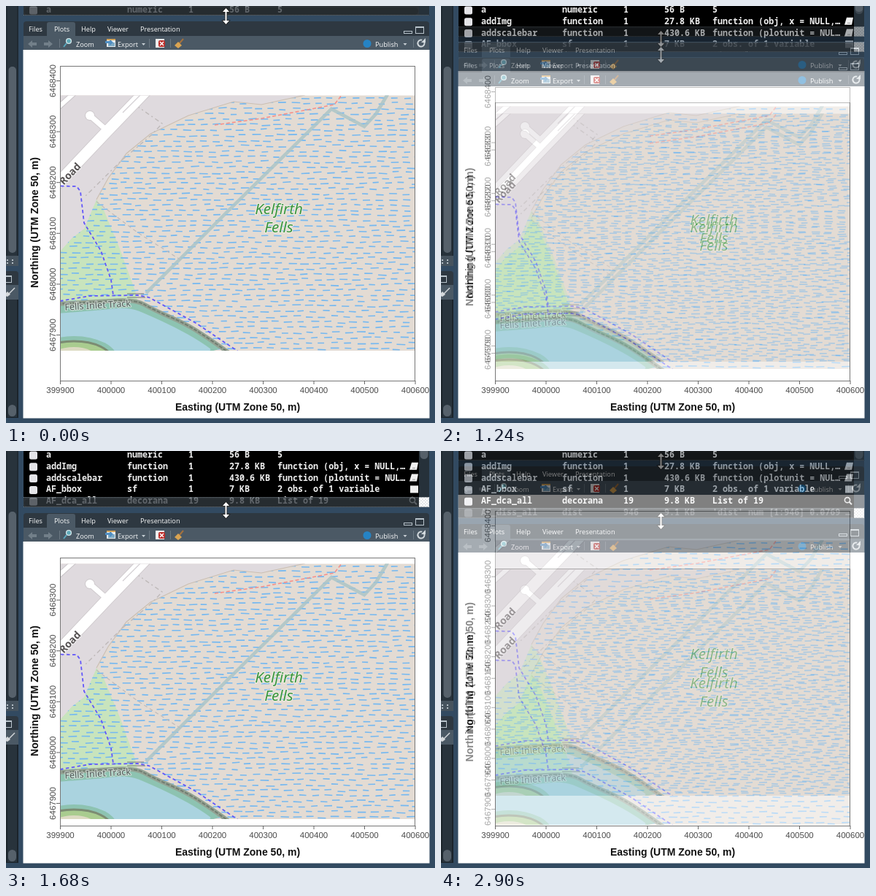
Recreate the animation shown at these times as an HTML page with a canvas. Size 588x571 px, loop 2920 ms.

```html
<!DOCTYPE html>
<html lang="en">
<head>
<meta charset="utf-8">
<title>Resizing the plot pane</title>
<style>
html, body { margin: 0; width: 100%; height: 100%; overflow: hidden; background: #324a61; }
canvas { display: block; width: 588px; height: 571px; }
</style>
</head>
<body>
<canvas id="stage" width="588" height="571"></canvas>
<script>
const W = 588, H = 571;
const UI = '"Open Sans", "Noto Sans", sans-serif';
const MONO = '"Noto Sans Mono", "DejaVu Sans Mono", monospace';
const AXIS = '"Liberation Sans", Arial, sans-serif';
const LABEL = '"Noto Sans", "Open Sans", sans-serif';
const BOX = { left: 74, right: 561, bottom: 513 };
const MAP = { top: 122.5, bottom: 472 };

// Splitter offset and pointer height of each pose
const POSES = [[0, 14], [14, 31], [29, 45], [50, 67], [64, 81], [79, 96]];
const STEP = 420, HOLD = 400, LAST_END = 2900, LOOP = 2920;

const ROWS = [
  ['a', 'numeric', '1', '56 B', '5', ''],
  ['addImg', 'function', '1', '27.8 KB', 'function (obj, x = NULL,…', 'doc'],
  ['addscalebar', 'function', '1', '430.6 KB', 'function (plotunit = NUL…', 'doc'],
  ['AF_bbox', 'sf', '1', '7 KB', '2 obs. of 1 variable', 'grid'],
  ['AF_dca_all', 'decorana', '19', '9.8 KB', 'List of 19', 'lens'],
  ['AF_diss_all', 'dist', '946', '9.1 KB', "'dist' num [1:946] 0.0769 …", '']
];
const COLS = [55, 166, 250, 306, 372];

function layer() {
  const c = document.createElement('canvas');
  c.width = W;
  c.height = H;
  return c;
}

function rect(g, x, y, w, h, fill) {
  g.fillStyle = fill;
  g.fillRect(x, y, w, h);
}

function pill(g, x, y, w, h, r, fill) {
  g.fillStyle = fill;
  g.beginPath();
  g.roundRect(x, y, w, h, r);
  g.fill();
}

function dot(g, x, y, r, fill) {
  g.fillStyle = fill;
  g.beginPath();
  g.arc(x, y, r, 0, Math.PI * 2);
  g.fill();
}

function trace(g, pts, smooth) {
  g.beginPath();
  g.moveTo(pts[0], pts[1]);
  const n = pts.length;
  for (let i = 2; i < n; i += 2) {
    if (smooth && i < n - 2) {
      g.quadraticCurveTo(pts[i], pts[i + 1], (pts[i] + pts[i + 2]) / 2, (pts[i + 1] + pts[i + 3]) / 2);
    } else {
      g.lineTo(pts[i], pts[i + 1]);
    }
  }
}

function line(g, pts, color, width = 1, dash = [], smooth = false) {
  trace(g, pts, smooth);
  g.strokeStyle = color;
  g.lineWidth = width;
  g.setLineDash(dash);
  g.stroke();
  g.setLineDash([]);
}

function area(g, pts, color, smooth) {
  trace(g, pts, smooth);
  g.closePath();
  g.fillStyle = color;
  g.fill();
}

function text(g, str, x, y, font, color, align = 'left') {
  g.font = font;
  g.fillStyle = color;
  g.textAlign = align;
  g.textBaseline = 'alphabetic';
  g.fillText(str, x, y);
}

function turned(g, x, y, angle, draw) {
  g.save();
  g.translate(x, y);
  g.rotate(angle);
  draw();
  g.restore();
}

function haloText(g, str, x, y, font, color, halo) {
  g.font = font;
  g.textAlign = 'center';
  g.lineJoin = 'round';
  g.strokeStyle = halo;
  g.lineWidth = 2.5;
  g.strokeText(str, x, y);
  text(g, str, x, y, font, color, 'center');
}

function seeded(seed) {
  return () => (seed = (seed * 16807) % 2147483647) / 2147483647;
}

function marsh(g) {
  const rnd = seeded(4127);
  for (let y = 126, r = 0; y < 474; y += 7.3, r++) {
    for (let x = 66 + (r % 2) * 8 + rnd() * 5; x < 566; x += 15.5 + rnd() * 4) {
      const len = 8 + rnd() * 4, dy = (rnd() - .5) * 3, tilt = (rnd() - .5) * 1.4;
      line(g, [x, y + dy, x + len, y + dy + tilt], '#74b8f1', 1.6);
    }
  }
}

function island(g, rx, ry, fill) {
  g.beginPath();
  g.ellipse(93, 484, rx, ry, 0, 0, Math.PI * 2);
  g.fillStyle = fill;
  g.fill();
}

function drawMap() {
  const c = layer(), g = c.getContext('2d');
  g.beginPath();
  g.rect(BOX.left, MAP.top, BOX.right - BOX.left, MAP.bottom - MAP.top);
  g.clip();
  rect(g, 0, 0, W, H, '#e3dbd3');
  const grass = [74, 336, 90, 318, 107, 305, 124, 265, 133, 277, 155, 330, 177, 390, 180, 402, 74, 406];
  area(g, grass, '#c8e4bd');
  line(g, [192, 393, 300, 285, 446, 141, 491, 165, 507, 148, 523, 121], '#b4c9c9', 4.5);
  marsh(g);
  line(g, [192, 393, 300, 285, 446, 141, 491, 165, 507, 148, 523, 121], '#b4c9c9b0', 4.5);

  // Residential ground
  const edge = [124, 265, 140, 236, 165, 202, 198, 175, 250, 150, 312, 131, 350, 135, 410, 122];
  area(g, [74, 122, 74, 336, 90, 318, 107, 305, ...edge], '#dfdade');
  line(g, edge, '#cbbfb3', 1.2);
  const faint = '#bfbaba';
  line(g, [178, 136, 214, 161, 200, 176, 160, 210, 107, 262], faint, 1.5, [6, 4, 2, 4]);
  line(g, [124, 268, 180, 310, 240, 348], faint, 1.2, [5, 4]);

  // Roads
  const road = [66, 248, 138, 172, 195, 113], spur = [139, 171, 115, 150];
  line(g, [66, 144, 96, 117], '#c9c4c8', 8);
  line(g, [66, 144, 96, 117], '#fff', 6);
  line(g, road, '#cfcacd', 17);
  line(g, spur, '#cfcacd', 9);
  dot(g, 115, 150, 7, '#cfcacd');
  line(g, road, '#fff', 15);
  line(g, spur, '#fff', 7);
  dot(g, 115, 150, 6, '#fff');
  line(g, [160, 146, 193, 113], '#d2ced2', 1.2);

  line(g, [286, 163, 350, 154, 450, 135, 460, 122], '#f6918a', 1.6, [5, 3]);

  // River with its banks
  const shore = [70, 408, 125, 405, 178, 402, 202, 416, 246, 435, 276, 454, 307, 476];
  area(g, [...shore, 70, 480], '#8dc3b1', true);
  const water = [70, 421, 125, 417, 168, 412, 195, 423, 232, 440, 266, 459, 292, 478];
  area(g, [...water, 70, 480], '#aad3df', true);
  line(g, shore, '#93a293', 6, [], true);
  line(g, shore, '#717c70', 2, [5, 2], true);
  island(g, 60, 32, '#8dc3b1');
  island(g, 52, 25, '#a9cc8f');
  g.strokeStyle = '#7c8c73';
  g.lineWidth = 3;
  g.stroke();
  island(g, 33, 17, '#dcdac2');

  // Footpaths
  const blue = '#6156fa';
  line(g, [75, 246.5, 97, 247, 102, 254, 107, 297, 130, 335, 144, 375, 147, 396], blue, 1.8, [4.5, 3.5]);
  line(g, [74, 404, 115, 397, 180, 396, 196, 399, 260, 434, 318, 473], blue, 1.8, [4.5, 3.5]);
  line(g, [166, 394, 189, 394], '#777', 1);
  line(g, [166, 399, 191, 399], '#777', 1);

  turned(g, 89, 231, -.8, () => haloText(g, 'Road', 0, 3, '600 14px ' + LABEL, '#555152', '#fff9'));
  turned(g, 126, 414, -.06, () =>
    haloText(g, 'Fells Inlet Track', 0, 0, '500 12.6px ' + LABEL, '#525958', '#dfe7e3aa'));
  const green = 'italic 500 20.5px ' + LABEL;
  haloText(g, 'Kelfirth', 374, 284.5, green, '#38963f', '#f1eee4cc');
  haloText(g, 'Fells', 374, 309.5, green, '#38963f', '#f1eee4cc');
  return c;
}

function plot(g, off, map) {
  const top = 82 + off, shift = Math.round(off / 2), ink = '#4a4a4a';
  rect(g, 23.5, 60 + off, 557, 504.5 - off, '#fff');
  g.drawImage(map, 0, shift);
  g.strokeStyle = '#777';
  g.lineWidth = 1;
  g.strokeRect(BOX.left + .5, top + .5, BOX.right - BOX.left - 1, BOX.bottom - top);
  const font = '11.5px ' + AXIS;
  for (let i = 0; i < 8; i++) {
    const x = BOX.left + .5 + i * 69.5;
    line(g, [x, BOX.bottom, x, BOX.bottom + 5], '#666');
    text(g, 399900 + i * 100, x, 530, font, ink, 'center');
  }
  for (let i = 0; i < 6; i++) {
    const y = 450.5 - i * 69.6 + shift;
    if (y < top) continue;
    line(g, [69, y, BOX.left, y], '#666');
    turned(g, 67.5, y, -Math.PI / 2, () => text(g, 6467900 + i * 100, 0, 0, font, ink, 'center'));
  }
  const bold = 'bold 14px ' + AXIS;
  text(g, 'Easting (UTM Zone 50, m)', 317.5, 554, bold, '#111', 'center');
  turned(g, 44, (top + BOX.bottom) / 2 - 1, -Math.PI / 2, () =>
    text(g, 'Northing (UTM Zone 50, m)', 0, 0, bold, '#111', 'center'));
}

function lens(g, x, y, color) {
  g.beginPath();
  g.arc(x, y, 3.6, 0, Math.PI * 2);
  g.strokeStyle = color;
  g.lineWidth = 1.6;
  g.stroke();
  line(g, [x + 2.6, y + 2.6, x + 6, y + 6], color, 2);
}

function broom(g, x, y, head, stick) {
  line(g, [x + 6, y - 7, x, y], stick, 2);
  area(g, [x - 1, y - 3, x + 4, y + 2, x - 1, y + 6, x - 6, y + 2], head);
}

function panes(g, x, y, w, h) {
  g.strokeStyle = '#b9c4cc';
  g.lineWidth = 1;
  g.strokeRect(x + .5, y + .5, w, h);
  rect(g, x, y, w + 1, 2, '#b9c4cc');
}

function rowIcon(g, kind, y) {
  if (kind === 'doc') {
    area(g, [556, y - 5, 565, y - 5, 563, y + 5, 553, y + 5], '#f0f0f0');
    line(g, [557, y + 2.5, 561, y + 2.5], '#999');
  }
  if (kind === 'grid') rect(g, 554, y - 5, 11, 10, '#f0f0f0');
  if (kind === 'lens') lens(g, 557, y - 1, '#ddd');
}

function environment(g, off) {
  const end = off + 13;
  g.save();
  g.beginPath();
  g.rect(24, 0, 556, end);
  g.clip();
  rect(g, 24, 0, 542, end, '#000');
  rect(g, 566, 0, 14, end, '#26313a');
  if (off >= 29) pill(g, 567.5, -20, 11, off < 50 ? 28 : 31, 5.5, '#566069');
  ROWS.forEach((row, i) => {
    const y = 5 + i * 15.8;
    pill(g, 32, y - 4.5, 11, 11, 2.5, '#e4e4e8');
    COLS.forEach((x, k) => text(g, row[k], x, y + 4, '600 11.7px ' + MONO, '#f0f0f0'));
    rowIcon(g, row[5], y);
  });

  // Ghost of the dragged splitter
  rect(g, 24, off - 1, 542, 14, 'rgba(66,74,81,.68)');
  pill(g, 25, off + 2, 540, 10, 5, 'rgba(20,25,30,.25)');
  if (off) {
    rect(g, 566, off - 1, 14, 14, '#e3e6e8');
    for (let y = 0; y < 14; y += 2) {
      for (let x = (y / 2) % 2 * 2; x < 14; x += 4) rect(g, 566 + x, off - 1 + y, 2, 2, '#fff');
    }
  }
  line(g, [24, off - .5, 580, off - .5], '#6c757c', 1, [1, 1]);
  line(g, [24, off + 12.5, 580, off + 12.5], '#6c757c', 1, [1, 1]);
  g.restore();
}

function caret(g, x, y) {
  area(g, [x - 2.5, y - 1, x + 2.5, y - 1, x, y + 2], '#c6ced4');
}

function arrow(g, x, y, dir) {
  area(g, [x + 6 * dir, y, x, y - 5, x, y - 2, x - 6 * dir, y - 2, x - 6 * dir, y + 2, x, y + 2, x, y + 5], '#727f89');
}

function header(g, off) {
  g.save();
  g.translate(0, off);
  pill(g, 24, 21, 556, 30, [4, 4, 0, 0], '#2e3841');
  rect(g, 24, 41, 556, 19, '#4b5965');
  pill(g, 56, 22, 39, 20, [3, 3, 0, 0], '#4b5965');
  const font = '500 9.2px ' + UI, ink = '#fafbfb';
  [['Files', 31], ['Plots', 66], ['Help', 103], ['Viewer', 139], ['Presentation', 184]]
    .forEach(([s, x]) => text(g, s, x, 35, font, ink));
  g.strokeStyle = '#b9c4cc';
  g.lineWidth = 1;
  g.strokeRect(545.5, 34.5, 11, 3);
  panes(g, 561, 28, 11, 9);

  arrow(g, 36, 52, -1);
  arrow(g, 58, 52, 1);
  [73, 196, 225].forEach(x => line(g, [x + .5, 45, x + .5, 57], '#6b7882'));
  dot(g, 86, 48, 3.6, '#5fa9b8');
  g.beginPath();
  g.arc(86, 48, 3.4, 0, Math.PI * 2);
  g.strokeStyle = '#d5e6ea';
  g.lineWidth = 1.3;
  g.stroke();
  line(g, [83, 51, 79, 56], '#58a7bd', 2);
  text(g, 'Zoom', 96, 56, font, ink);
  rect(g, 138, 45, 12, 11, '#e9eef1');
  rect(g, 140, 50, 9, 5, '#7daac5');
  area(g, [136, 48, 142, 48, 142, 45, 147, 50, 142, 54, 142, 51, 136, 51], '#508ec2');
  rect(g, 138, 45, 12, 2, '#d4a55b');
  text(g, 'Export', 153, 56, font, ink);
  caret(g, 188.5, 52);
  rect(g, 205, 45, 12, 12, '#eee');
  pill(g, 209, 47, 9, 9, 2, '#bd2f2b');
  line(g, [211, 49, 216, 54], '#fff', 1.4);
  line(g, [216, 49, 211, 54], '#fff', 1.4);
  broom(g, 237, 52, '#d9a452', '#a4713d');
  dot(g, 495, 51.5, 5.5, '#2683c4');
  text(g, 'Publish', 506, 56, font, ink);
  caret(g, 547, 52);
  line(g, [558.5, 45, 558.5, 57], '#6b7882');
  g.beginPath();
  g.arc(569, 51, 4.6, -.3, 5);
  g.strokeStyle = '#d3dade';
  g.lineWidth = 2;
  g.stroke();
  area(g, [569, 50, 575, 50, 575, 44], '#d3dade');
  g.restore();
}

function leftEdge(g) {
  rect(g, 0, 0, 17, 343, '#202a32');
  rect(g, 2, 0, 13, 342, '#28333c');
  pill(g, 3.5, 83, 10.5, 255, 5, '#56616b');
  rect(g, 0, 342, 17, 14, '#46535e');
  [1, 8].forEach(x => [347, 351].forEach(y => rect(g, x, y, 2, 2, '#b5bec5')));
  pill(g, -6, 363, 23, 24, [0, 4, 0, 0], '#2e3841');
  panes(g, -4, 369, 11, 9);
  rect(g, 0, 382, 17, 20, '#4b5965');
  line(g, [12, 386, 4, 394], '#d5d9dc', 1.5);
  area(g, [2, 391, 6, 395, 2, 398, -1, 397, -1, 394], '#d5d9dc');
  rect(g, 0, 402, 17, 162, '#1b242b');
  rect(g, 2, 402, 13, 161, '#28333c');
  pill(g, 3, 546, 11, 16, 5.5, '#56616b');
}

function pointer(g, y) {
  const x = 301.5;
  const pts = [x, y - 11, x + 4.5, y - 6, x + 1, y - 6, x + 1, y + 6, x + 4.5, y + 6, x, y + 11,
    x - 4.5, y + 6, x - 1, y + 6, x - 1, y - 6, x - 4.5, y - 6, x, y - 11];
  line(g, pts, '#222', 1.6);
  area(g, pts, '#fff');
}

function scene([off, pointerY], map) {
  const c = layer(), g = c.getContext('2d');
  rect(g, 0, 0, W, H, '#324a61');
  leftEdge(g);
  environment(g, off);
  plot(g, off, map);
  header(g, off);
  pointer(g, pointerY);
  return c;
}

const stage = document.getElementById('stage').getContext('2d');
const map = drawMap();
const scenes = POSES.map(p => scene(p, map));
const start = performance.now();

function frame() {
  const t = (performance.now() - start) % LOOP;
  const i = Math.min(scenes.length - 1, Math.floor(t / STEP));
  const end = i === scenes.length - 1 ? LAST_END : i * STEP + HOLD;
  stage.drawImage(scenes[i], 0, 0);
  if (t >= end) {
    stage.globalAlpha = .5;
    stage.drawImage(scenes[(i + 1) % scenes.length], 0, 0);
    stage.globalAlpha = 1;
  }
  requestAnimationFrame(frame);
}
frame();
</script>
</body>
</html>
```
